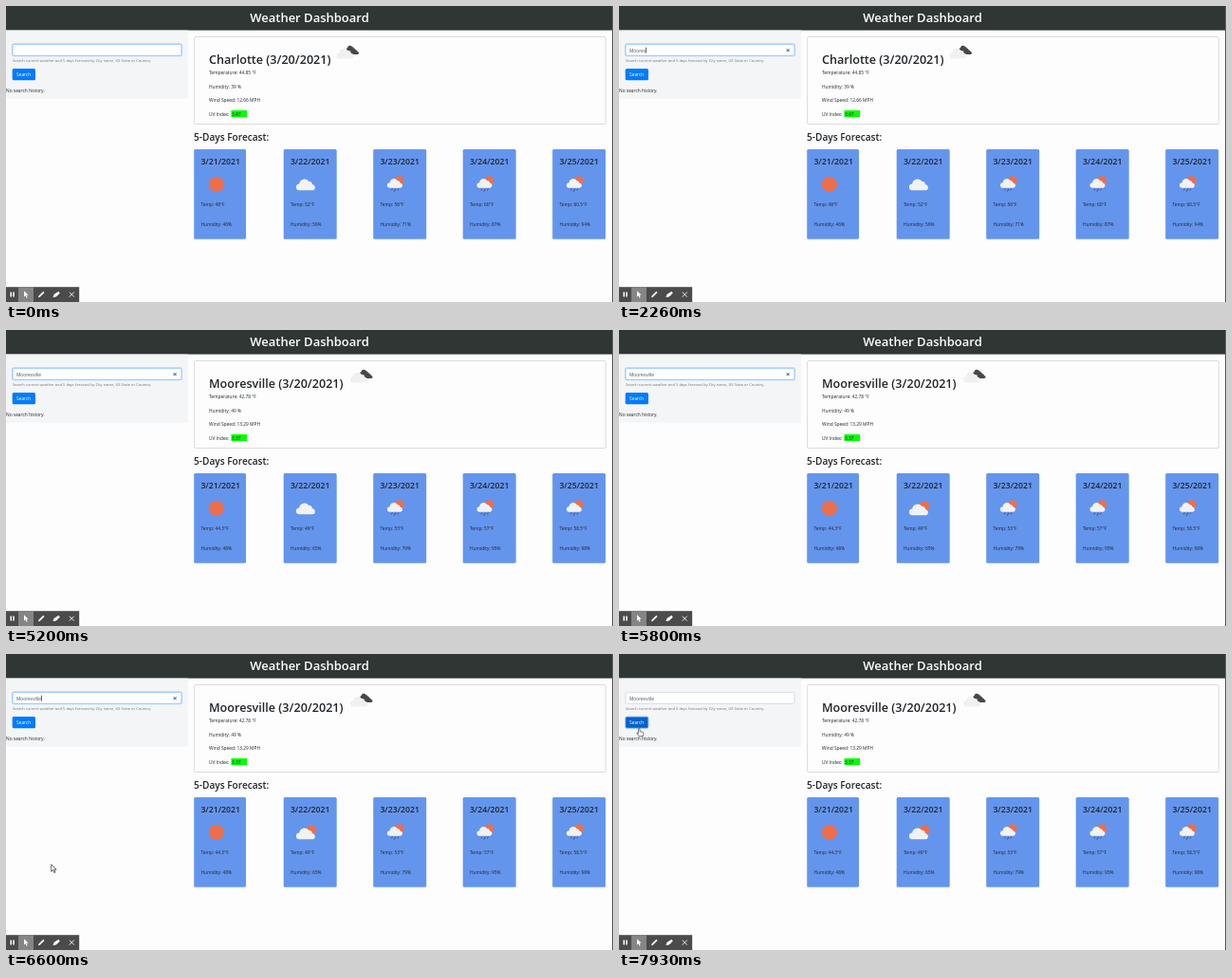
Write an HTML page that moves like this. It is 640x312 px and loops after 8 s.

```html
<!DOCTYPE html>
<html lang="en">
<head>
<meta charset="utf-8">
<title>Weather Dashboard</title>
<style>
  html, body { margin: 0; width: 100%; height: 100%; overflow: hidden; background: #fdfdfd; }
  svg { display: block; }
  text { font: 4.85px "Open Sans", "Noto Sans", sans-serif; fill: #212529; white-space: pre; }
  .title { font-size: 13px; font-weight: 600; fill: #fff; text-anchor: middle; }
  .city { font-size: 12.6px; font-weight: 600; }
  .heading { font-size: 10.1px; font-weight: 600; }
  .date { font-size: 8.7px; font-weight: 600; }
  .hint { font-size: 4.02px; fill: #6c757d; }
  .typed { fill: #495057; }
  .filled { font-size: 4.1px; fill: #111; }
</style>
</head>
<body>
<svg width="640" height="312" viewBox="0 0 640 312">
  <defs>
    <path id="cloud" d="M-7 6.3a3.4 3.4 0 0 1-.2-6.8A5.5 5.5 0 0 1 2.8-3.2 4 4 0 0 1 6.6 0 3.2 3.2 0 0 1 7 6.3z"/>
    <g id="sunny"><circle r="8.1" fill="#ec6e4c"/></g>
    <g id="cloudy"><use href="#cloud" fill="#f2f2f2"/></g>
    <g id="partly">
      <circle cx="5.5" cy="-2.5" r="5.3" fill="#ec6e4c"/>
      <use href="#cloud" y="1" fill="#f2f2f2"/>
    </g>
    <g id="rainy">
      <circle cx="4" cy="-4" r="4.8" fill="#ec6e4c"/>
      <use href="#cloud" transform="translate(-.5 -1.4) scale(.8)" fill="#f2f2f2"/>
      <path d="M-3.5 4.6l-1 1.8M0 4.6l-1.6 3M3 4.6l-1 1.8" stroke="#484848" stroke-width=".9"/>
    </g>
    <g id="broken">
      <use href="#cloud" transform="translate(3.6 -4) scale(.5)" fill="#484848"/>
      <use href="#cloud" transform="translate(7.3 -.6) scale(.5)" fill="#484848"/>
      <use href="#cloud" transform="translate(-2 1.3) scale(.9)" fill="#f0f0f0"/>
    </g>
    <path id="arrow" d="M0 0v7.4l1.8-1.6 1.3 2.9 1.2-.6L3 5.3h2.4z"/>
  </defs>

  <rect width="640" height="25.6" fill="#303634"/>
  <text class="title" x="320" y="16.8">Weather Dashboard</text>
  <rect x="639" width="1" height="312" fill="#555"/>

  <rect y="25.6" width="192" height="72" fill="#f4f5f7"/>
  <rect id="ring" x="6" y="39.3" width="180" height="14" rx="2.2" fill="#bfdeff"/>
  <rect id="field" x="7" y="40.3" width="178" height="12" rx="1.5" stroke-width=".8"/>
  <text id="typed" x="11" y="48.6"></text>
  <rect id="caret" y="43.7" width=".7" height="6" fill="#222"/>
  <path id="clear" d="M176.7 45.2l2.8 2.8m0-2.8l-2.8 2.8" stroke="#174a8c" stroke-width="1"/>
  <text class="hint" x="7" y="59">Search current weather and 5 days forecast by City name, US State or Country.</text>
  <rect id="button" x="6.7" y="66" width="24.3" height="12.3" rx="1.5"/>
  <text x="11" y="73.8" style="fill:#fff">Search</text>
  <text x="0" y="91">No search history.</text>

  <rect x="198.5" y="32.5" width="434" height="92" rx="1.5" fill="#fdfdfd" stroke="#d6d6d6" stroke-width=".8"/>
  <g id="report"></g>
  <text class="heading" x="198" y="142">5-Days Forecast:</text>
  <g id="cards"></g>

  <rect y="296.2" width="77.2" height="15.8" fill="#4b4b4b"/>
  <rect x="13" y="296.2" width="16" height="15.8" fill="#858585"/>
  <g fill="#fff">
    <path d="M4.5 301.5h1.5v5h-1.5zM7.3 301.5h1.5v5h-1.5z"/>
    <use href="#arrow" transform="translate(19 300.3) scale(.85)"/>
    <path d="M34 307.3l.5-1.9 4.8-4.6 1.3 1.3-4.8 4.7zM49.5 307l1-3 5-3.2 1.3 2-4 3.6z"/>
    <path d="M66.8 301.6l5 5m0-5l-5 5" stroke="#fff" stroke-width=".9"/>
  </g>

  <use id="pointer" href="#arrow" fill="#fff" stroke="#222" stroke-width=".7"/>
  <path id="hand" fill="#fff" stroke="#222" stroke-width=".6"
    d="M20.4 84v-5.3q.8-1 1.6 0v3l3 .7q1 .4.8 1.5l-.6 2.8h-4l-2.5-3.3q.2-1 1.7.6z"/>
</svg>
<script>
const LOOP = 8000;
const $ = id => document.getElementById(id);

const cities = [
  { name: "Charlotte", iconX: 360, temp: 44.85, humidity: 39, wind: 12.66, uv: 3.47,
    temps: [48, 52, 56, 60, 60.5], humidities: [46, 59, 71, 87, 94] },
  { name: "Mooresville", iconX: 374.5, temp: 42.78, humidity: 49, wind: 13.29, uv: 3.37,
    temps: [44.3, 49, 53, 57, 58.5], humidities: [48, 65, 79, 95, 98] }
];

// [time, number of letters typed, caret visible]
const typing = [
  [0, 0, 0], [60, 1, 1], [130, 2, 1], [200, 3, 1], [260, 4, 1], [330, 5, 1],
  [1000, 5, 0], [1530, 5, 1], [2060, 5, 0], [2260, 6, 1], [2930, 7, 1],
  [3130, 7, 0], [3660, 7, 1], [3930, 8, 1], [4000, 9, 1], [4060, 10, 1],
  [4400, 11, 1], [4930, 11, 0], [5270, 11, 1], [5800, 11, 0], [6330, 11, 1], [6860, 11, 0]
];

const text = (x, y, content, cls = "") => `<text class="${cls}" x="${x}" y="${y}">${content}</text>`;
const icon = (name, x, y) => `<use href="#${name}" x="${x}" y="${y}"/>`;
const show = (id, visible) => $(id).setAttribute("visibility", visible ? "visible" : "hidden");

function drawWeather(city, secondDay) {
  $("report").innerHTML =
    text(214, 60.6, `${city.name} (3/20/2021)`, "city") + icon("broken", city.iconX, 48.5) +
    text(214, 72, `Temperature: ${city.temp} °F`) +
    text(214, 86.6, `Humidity: ${city.humidity} %`) +
    text(214, 101, `Wind Speed: ${city.wind} MPH`) +
    text(214, 115.6, "UV Index:") +
    `<rect x="237.5" y="110" width="16.5" height="7" fill="#0f0"/>` +
    text(238, 115.6, city.uv);
  const icons = ["sunny", secondDay, "rainy", "rainy", "rainy"];
  $("cards").innerHTML = icons.map((name, i) => {
    const x = 198.2 + i * 94.5, width = i ? 56 : 54.8;
    return `<rect x="${x}" y="151" width="${width}" height="94.8" rx="1.5" fill="#6495ed"/>` +
      text(x + 7.2, 166.6, `3/${21 + i}/2021`, "date") + icon(name, x + 23.7, 188) +
      text(x + 7.2, 210.6, `Temp: ${city.temps[i]}°F`) +
      text(x + 7.2, 231.8, `Humidity: ${city.humidities[i]}%`);
  }).join("");
}

function drawForm(t) {
  const [, letters, caretOn] = typing.findLast(step => t >= step[0]);
  const preview = t >= 6930 && t < 7400;
  const focused = t < 7860;
  const typed = $("typed");
  typed.textContent = preview ? "mooresville" : "Mooresville".slice(0, letters);
  typed.setAttribute("class", preview ? "filled" : "typed");
  $("caret").setAttribute("x", 11.2 + (letters ? typed.getComputedTextLength() : 0));
  show("caret", caretOn);
  show("clear", letters && focused);
  show("ring", focused);
  $("field").setAttribute("fill", preview ? "#e8f0fe" : "#fff");
  $("field").setAttribute("stroke", focused ? "#80bdff" : "#ced4da");
  $("button").setAttribute("fill", t >= 7730 ? "#0062cc" : "#007bff");
  $("button").setAttribute("stroke", focused ? "none" : "#9fcbff");
}

function drawPointer(t) {
  const p = Math.min(1, Math.max(0, (t - 6400) / 530));
  const ease = p * p * (3 - 2 * p);
  $("pointer").setAttribute("transform", `translate(${60 - 38 * ease} ${296 - 230 * ease})`);
  show("pointer", t >= 6400 && t < 6930);
  show("hand", t >= 7730);
}

let shown;
function frame(now) {
  const t = now % LOOP;
  const city = t < 4930 ? 0 : 1;
  const secondDay = t < 5530 ? "cloudy" : "partly";
  if (shown !== city + secondDay) {
    shown = city + secondDay;
    drawWeather(cities[city], secondDay);
  }
  drawForm(t);
  drawPointer(t);
  requestAnimationFrame(() => frame(performance.now() - start));
}
const start = performance.now();
frame(0);
</script>
</body>
</html>
```
